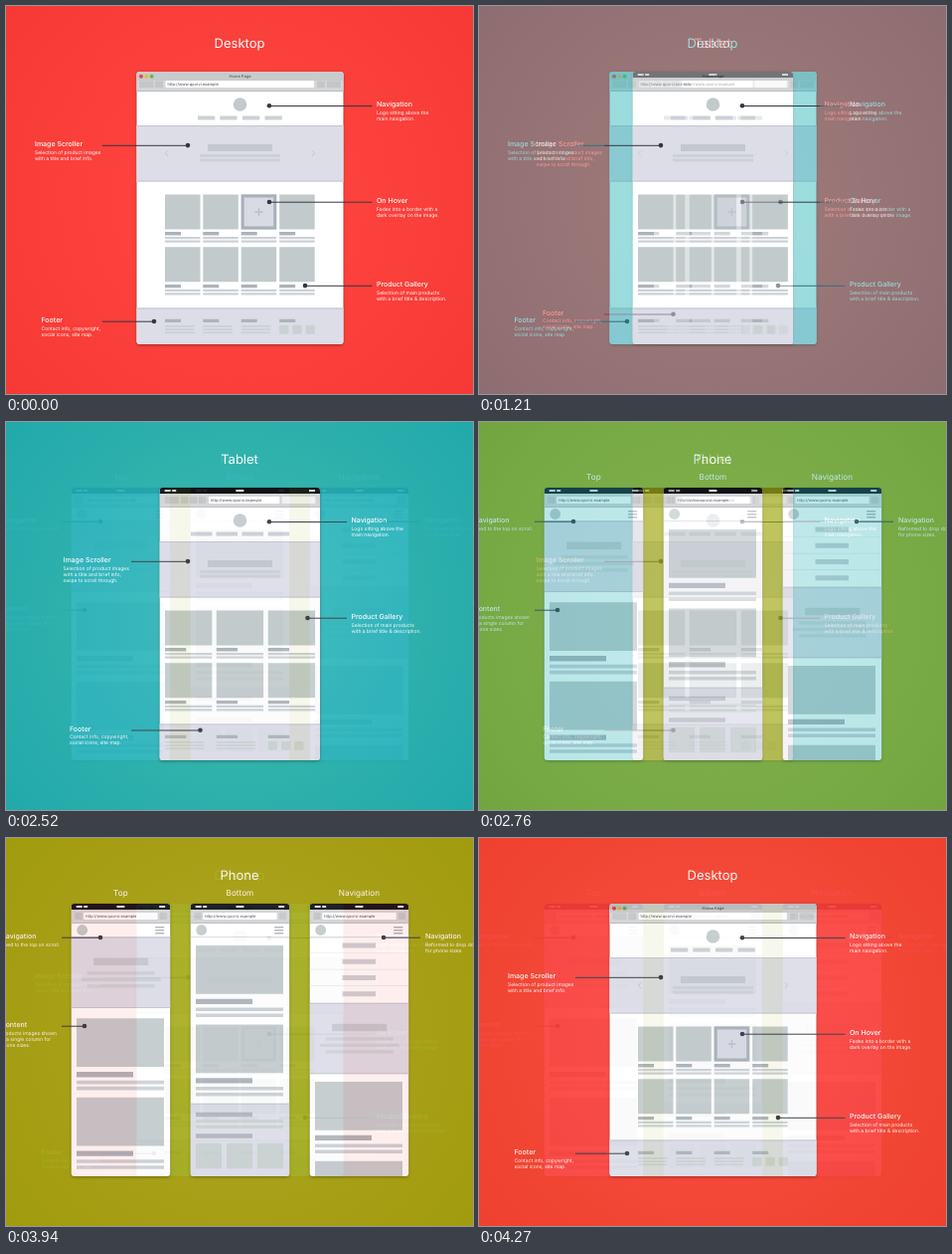
These frames come from a looping animation (470x390 px, 4300 ms). An HTML page with a canvas:

```html
<!DOCTYPE html>
<html lang="en">
<head>
<meta charset="utf-8">
<title>Responsive wireframes</title>
<style>
html, body { margin: 0; width: 100%; height: 100%; overflow: hidden; }
canvas { display: block; }
</style>
</head>
<body>
<canvas id="stage" width="470" height="390"></canvas>
<script>
const W = 470, H = 390, TOP = 66, BOTTOM = 340;
const URL_TEXT = 'http://www.quorvi.example';
const INK = '#343743', IMAGE = '#c2cacc', TITLE = '#adb3ba', LINE = '#ccd1d6',
      PANEL = '#dcdde7', EDGE = '#c3c6cd', CHROME = '#d5d6d8', BUTTON = '#c4c6c8', FOOT = '#cad2d1';
let g;

function box(x, y, w, h, color, r = 0) {
  g.fillStyle = color;
  g.beginPath();
  g.roundRect(x, y, w, h, r);
  g.fill();
}

function disc(x, y, r, color) {
  g.fillStyle = color;
  g.beginPath();
  g.arc(x, y, r, 0, 7);
  g.fill();
}

function stroke(color, width, ...points) {
  g.strokeStyle = color;
  g.lineWidth = width;
  g.beginPath();
  points.forEach(([x, y]) => g.lineTo(x, y));
  g.stroke();
}

function text(str, x, y, size, color = '#fff', weight = 400, align = 'left') {
  g.font = `${weight} ${size}px Inter, "Open Sans", sans-serif`;
  g.textAlign = align;
  g.fillStyle = color;
  g.fillText(str, x, y);
}

function backdrop(inner, outer) {
  const fade = g.createRadialGradient(235, 195, 60, 235, 195, 305);
  fade.addColorStop(0, inner);
  fade.addColorStop(1, outer);
  box(0, 0, W, H, fade);
}

// White page with a soft shadow; content is clipped to it.
function page(x, w, draw) {
  g.save();
  g.shadowColor = 'rgba(0,0,0,.35)';
  g.shadowBlur = 3;
  g.shadowOffsetY = 1;
  box(x, TOP, w, BOTTOM - TOP, '#fff', 3);
  g.restore();
  g.save();
  g.beginPath();
  g.roundRect(x, TOP, w, BOTTOM - TOP, 3);
  g.clip();
  draw();
  g.restore();
}

function panel(x, y, w, h) {
  box(x, y, w, h, PANEL);
  box(x, y, w, 1, EDGE);
  box(x, y + h - 1, w, 1, EDGE);
}

function label(x, y, title, ...lines) {
  text(title, x, y + 2.5, 7, '#fff', 500);
  lines.forEach((line, i) => text(line, x, y + 10.2 + i * 6, 5));
}

function pointer(x, y, end) {
  stroke(INK, 1, [x, y + .5], [end, y + .5]);
  disc(x, y + .3, 2.3, INK);
}

function statusBar(x, w) {
  box(x, TOP, w, 6, '#101316');
  box(x + 5, 68, 6, 2, '#ddd');
  box(x + 12.5, 68, 4, 2, '#ddd');
  box(x + w / 2 - 4, 68, 8, 2, '#ddd');
  box(x + w - 11, 68, 6, 2, '#ddd');
  box(x, 72, w, 13.5, CHROME);
  box(x, 85, w, 1, '#bfc1c4');
}

function address(x, w) {
  box(x, 75, w, 7, '#fff', 1);
  text(URL_TEXT, x + 2, 80.2, 4, '#454850');
}

// Header, image scroller and footer panel shared by the two wide layouts.
function wideLayout(x, w, columns, colW, titleW) {
  disc(235.5, 99, 6.8, IMAGE);
  panel(x, 120, w, 56.5);
  box(203, 139, 65, 7, '#c3c8ce');
  box(195, 149, 81, 3, LINE);
  box(195, 153.5, 81, 3, LINE);
  for (const y of [189.5, 242.3]) {
    for (const c of columns) {
      box(c, y, colW, 35, IMAGE);
      box(c, y + 37.6, titleW, 3.3, TITLE);
      box(c, y + 42.5, colW, 2.2, LINE);
      box(c, y + 46, colW, 2.2, LINE);
    }
  }
  panel(x, 303.5, w, 40);
  columns.forEach((c, i) => {
    box(c, 314.7, titleW, 3.3, TITLE);
    for (let k = 0; k < 3; k++) {
      if (i < columns.length - 1) box(c, 321 + k * 3.2, colW * .83, 1.8, FOOT);
      else box(c + k * 13.2, 320.7, 9.3, 9, FOOT, 1);
    }
  });
}

function desktop() {
  backdrop('#ff443f', '#f63934');
  text('Desktop', 235, 41.8, 13, '#fff', 400, 'center');
  page(131.5, 208, () => {
    box(131, TOP, 210, 20, CHROME);
    box(131, TOP, 210, 9, '#c9cacc');
    box(131, 85, 210, 1, '#b9bbbe');
    ['#e8483f', '#e9b83c', '#69b84b'].forEach((c, i) => disc(136 + i * 5.3, 70.8, 2, c));
    text('Home Page', 235.5, 72.3, 4, '#454850', 400, 'center');
    for (const [x, w] of [[134, 14.5], [150, 8], [313, 8], [323, 14]]) box(x, 75.5, w, 6.8, BUTTON, 1);
    address(160.5, 149.5);
    [193, 215.3, 238, 260.5].forEach(x => box(x, 110.5, 17.3, 4, LINE));
    wideLayout(131, 210, [160, 198.3, 236.7, 275.2], 35.5, 16);
    stroke('#bfc3ca', 1, [163, 145.5], [160.5, 148.2], [163, 151]);
    stroke('#bfc3ca', 1, [308, 145.5], [310.5, 148.2], [308, 151]);
    box(236.7, 189.5, 35.5, 35, '#a9b0b8');
    box(239.7, 192.5, 29.5, 29, '#d8dbe4');
    stroke('#b9bec7', 1.3, [250.5, 207], [258.5, 207]);
    stroke('#b9bec7', 1.3, [254.5, 203], [254.5, 211]);
  });
  pointer(265, 100, 368.5);
  pointer(265, 196.7, 368.5);
  pointer(301, 280.8, 368.5);
  pointer(183, 139.8, 97);
  pointer(149, 316.7, 97);
  label(373, 98.5, 'Navigation', 'Logo sitting above the', 'main navigation.');
  label(373, 195.5, 'On Hover', 'Fades into a border with a', 'dark overlay on the image.');
  label(373, 279.3, 'Product Gallery', 'Selection of main products', 'with a brief title & description.');
  label(29, 138.5, 'Image Scroller', 'Selection of product images', 'with a title and brief info.');
  label(35.5, 315.3, 'Footer', 'Contact info, copywright,', 'social icons, site map.');
}

function tablet() {
  backdrop('#30b8ba', '#17aaba');
  text('Tablet', 235, 41.8, 13, '#fff', 400, 'center');
  page(154.7, 161.3, () => {
    statusBar(154.7, 161.3);
    for (const [x, w] of [[160, 14], [176, 7.5], [185, 7.5], [194, 7.5]]) box(x, 75, w, 7, BUTTON, 1);
    address(204, 71.5);
    box(277.5, 75, 34, 7, '#f4f4f5', 1);
    [186, 211.5, 237.5, 263.7].forEach(x => box(x, 110.5, 21.5, 4, LINE));
    wideLayout(154, 163, [160, 211.8, 263.8], 47.3, 21.3);
  });
  pointer(265, 100, 343);
  pointer(303.5, 196.7, 343);
  pointer(183, 139.8, 126);
  pointer(195.5, 309.5, 126);
  label(347.5, 98.5, 'Navigation', 'Logo sitting above the', 'main navigation.');
  label(347.5, 195.5, 'Product Gallery', 'Selection of main products', 'with a brief title & description.');
  label(57.5, 138.5, 'Image Scroller', 'Selection of product images', 'with a title and brief info,', 'swipe to scroll through.');
  label(64, 308, 'Footer', 'Contact info, copywright,', 'social icons, site map.');
}

function handset(x, name, draw) {
  text(name, x + 49.7, 58.3, 8.2, '#fff', 400, 'center');
  page(x, 99.5, () => {
    statusBar(x, 99.5);
    box(x + 3.5, 75, 7.5, 7, BUTTON, 1);
    address(x + 12.5, 74.5);
    box(x + 89, 75, 7.5, 7, BUTTON, 1);
    disc(x + 11, 92.5, 5.4, IMAGE);
    for (const y of [89, 92, 95]) box(x + 84.5, y, 9, 1.4, TITLE);
    box(x, 99, 100, 1, '#d9dbe0');
    draw();
  });
}

function card(x, y) {
  box(x, y, 88, 48.7, IMAGE);
  box(x, y + 53.7, 57, 5.4, TITLE);
  box(x, y + 62.5, 88, 3.6, LINE);
  box(x, y + 68.5, 88, 3.6, LINE);
}

function scroller(x, y) {
  panel(x, y, 100, 71.5);
  box(x + 22.5, y + 21, 55, 7.5, '#c3c8ce');
  [68, 80, 68].forEach((w, i) => box(x + 50 - w / 2, y + 34.5 + i * 6.5, w, 3.4, LINE));
}

function phone() {
  backdrop('#a6ad1c', '#9aa40b');
  text('Phone', 235, 41.8, 13, '#fff', 400, 'center');
  handset(65.7, 'Top', () => {
    scroller(65.7, 99.5);
    card(71, 181.3);
    card(71, 260.7);
  });
  handset(185.7, 'Bottom', () => {
    card(191, 108);
    card(191, 187.5);
    panel(185.7, 266.7, 100, 80);
    box(191, 275.7, 57, 4.5, TITLE);
    box(191, 283, 88, 3, FOOT);
    box(191, 289, 88, 3, FOOT);
    box(191, 297.3, 57, 4.5, TITLE);
    for (let i = 0; i < 3; i++) box(191 + i * 31, 307, 26, 25.3, FOOT, 1);
  });
  handset(305.7, 'Navigation', () => {
    for (let i = 0; i < 4; i++) {
      box(338.5, 105.6 + i * 16.2, 33.5, 5, LINE);
      if (i) box(305, 99 + i * 16.4, 101, .7, '#e6e7ec');
    }
    scroller(305.7, 165.7);
    card(311, 245);
    card(311, 324.7);
  });
  pointer(95, 99.7, 56);
  pointer(79, 188.7, 56);
  pointer(380, 99.7, 417);
  label(-5.5, 98.5, 'Navigation', 'Fixed to the top on scroll.');
  label(-5.5, 187.5, 'Content', 'Products images shown', 'in a single column for', 'phone sizes.');
  label(422, 98.5, 'Navigation', 'Reformed to drop down', 'for phone sizes.');
}

const scenes = [desktop, tablet, phone].map(draw => {
  const layer = document.createElement('canvas');
  layer.width = W;
  layer.height = H;
  g = layer.getContext('2d');
  g.textRendering = 'geometricPrecision';
  draw();
  return layer;
});

const view = document.getElementById('stage').getContext('2d');
const LOOP = 4300, STEP = 30, STEPS = 13, FADES = [1060, 2520, 3940];

// Each scene holds, then dissolves into the next in even steps.
function frame() {
  const t = performance.now() % LOOP;
  let i = FADES.findIndex(start => t < start + STEP * STEPS);
  const mix = Math.max(0, Math.floor((t - FADES[i]) / STEP) + 1) / STEPS;
  view.globalAlpha = 1;
  view.drawImage(scenes[i], 0, 0);
  view.globalAlpha = Math.min(1, mix);
  view.drawImage(scenes[(i + 1) % 3], 0, 0);
  requestAnimationFrame(frame);
}
frame();
</script>
</body>
</html>
```
